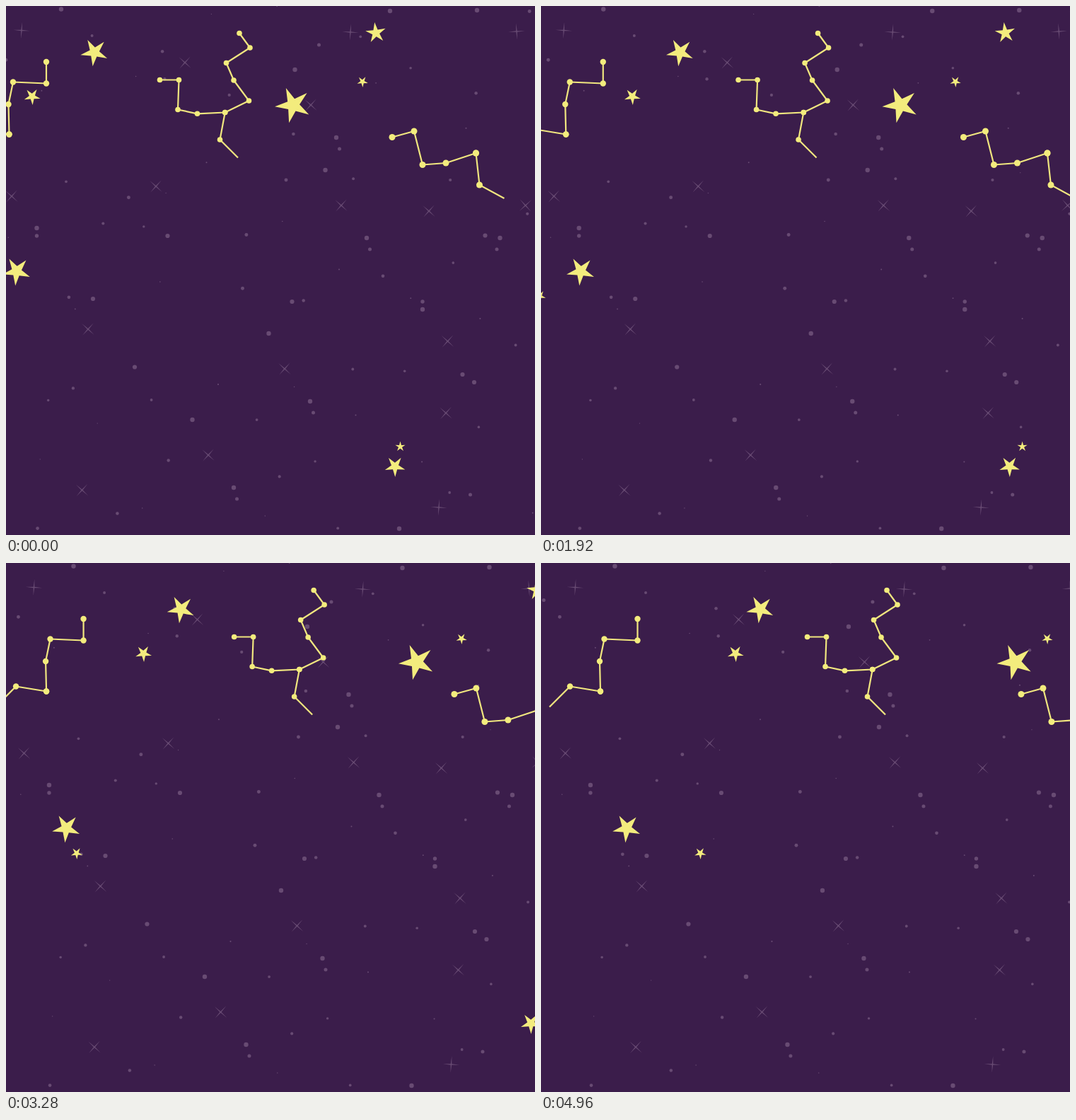
These frames come from a looping animation (748 by 748 pixels, 5 s). An HTML page:

```html
<!DOCTYPE html>
<html lang="en">
<head>
<meta charset="utf-8">
<title>Night sky</title>
<style>
html, body { margin: 0; width: 100%; height: 100%; overflow: hidden; background: #3b1d4b; }
svg { display: block; width: 100vw; height: 100vh; }
</style>
</head>
<body>
<svg id="sky" viewBox="0 0 748 748"></svg>
<script>
const LOOP = 5000, STEP = 40, SIZE = 748;
const YELLOW = '#f3ec7d', LINE = '#f0e67f', DUST = '#684b73';
const sky = document.getElementById('sky');
const layers = [];

function add(parent, tag, attrs) {
  const el = document.createElementNS('http://www.w3.org/2000/svg', tag);
  for (const k in attrs) el.setAttribute(k, attrs[k]);
  parent.appendChild(el);
  return el;
}

// A group that drifts right at the given speed (px per second).
function layer(speed, fill, x = 0, y = 0) {
  const el = add(sky, 'g', { fill });
  layers.push({ el, speed, x, y });
  return el;
}

const dot = (parent, cx, cy, r) => add(parent, 'circle', { cx, cy, r });

// Points of a star with the given number of tips; turn is in degrees.
function starPoints(tips, outer, inner, turn) {
  return Array.from({ length: tips * 2 }, (_, i) => {
    const r = i % 2 ? inner : outer;
    const a = turn * Math.PI / 180 + i * Math.PI / tips;
    return `${(r * Math.cos(a)).toFixed(2)},${(r * Math.sin(a)).toFixed(2)}`;
  }).join(' ');
}

function sparkle(parent, x, y, turn) {
  add(parent, 'polygon', { points: starPoints(4, 11.8, 1.1, turn), transform: `translate(${x} ${y})` });
}

function random(seed) {
  return () => (seed = seed * 16807 % 2147483647) / 2147483647;
}

// Dust motifs, repeated over the sky with mirroring.
const motifs = {
  plus(g) {
    sparkle(g, 0, 0, 4);
    dot(g, 56, -30, 3.2);
    dot(g, -44.5, 18, 2.5);
  },
  clump(g) {
    dot(g, 0, 0, 3.2);
    dot(g, 4.5, 16, 2.5);
    dot(g, -58.5, -96, 3.2);
    sparkle(g, -36, -46, 42);
  },
  pair(g) {
    dot(g, 0, 0, 3.2);
    dot(g, 0, 11, 2.7);
    sparkle(g, -35.5, -45, 42);
  },
  cross(g) { sparkle(g, 0, 0, 42); },
  speck(g) { dot(g, 0, 0, 3.1); }
};

const dust = layer(5.33, DUST);

function place(name, spots) {
  for (const [x, y, sx = 1, sy = 1] of spots)
    motifs[name](add(dust, 'g', { transform: `translate(${x} ${y}) scale(${sx} ${sy})` }));
}

place('plus', [[22, 34.5], [487, 37], [722, 36, -1], [612, 709, -1, -1]]);
place('clump', [[467, 186], [510, 328], [430, 559], [322, 681], [698.5, 328, -1]]);
place('pair', [[43.5, 314], [589, 429, -1, -1]]);
place('cross', [[253, 80], [212, 255], [598, 290], [116, 457], [622, 575.5], [107.5, 684.5]]);
place('speck', [[123, 414], [182, 510.5], [228.5, 325], [404.5, 418], [645.5, 521], [662, 532], [677.5, 324.5]]);

// Finer dust: one speck per jittered grid cell.
const rnd = random(29), CELLS = 8, cell = SIZE / CELLS;
for (let i = 0; i < CELLS * CELLS; i++) {
  const x = (i % CELLS + rnd()) * cell;
  const y = (Math.floor(i / CELLS) + rnd()) * cell;
  dot(dust, x.toFixed(1), y.toFixed(1), i % 5 < 3 ? 1.7 + 0.8 * rnd() : 0.6 + 0.5 * rnd());
}

function constellation(speed, points, tail, r, width) {
  const g = layer(speed, YELLOW);
  const stroke = pts => add(g, 'polyline', {
    points: pts, fill: 'none', stroke: LINE, 'stroke-width': width, 'stroke-linejoin': 'round'
  });
  stroke(points);
  stroke(tail);
  // The tail's last point stays open, without a dot.
  const ends = tail.split(' ').slice(0, -1).join(' ');
  for (const p of `${points} ${ends}`.split(' ')) dot(g, ...p.split(','), r);
}

constellation(16.03, '57,79 57,109.5 10,107.5 3.5,139 4.5,181.5', '4.5,181.5 -38.5,174.5 -67.5,203.5', 4.2, 2.2);
constellation(32.06,
  '217.5,104.5 244.5,104.5 243,146.5 270.5,152.3 309.7,150.5 343.5,134 322,105 311.5,80.5 345,59 330,38.5',
  '309.7,150.5 302.5,189 328,214.5', 3.8, 2.2);
constellation(26.8, '546,185.5 577,177 589,224.5 622,222 664.5,208', '664.5,208 669.5,253 704.5,272', 4.5, 2.2);

// x, y, radius, turn, speed
const stars = [
  [125, 65.5, 20, 25, 37.3],
  [37, 128, 12, 15, 48],
  [406, 140, 26, 31, 53.3],
  [523, 38, 15, 47, 69.5],
  [504, 107, 8, 15, 42.7],
  [15, 375, 20.5, 23, 21.4],
  [550, 651, 15, 17, 58.6],
  [557.5, 623, 7.5, 54, 64.1],
  [-144.8, 410.5, 8.6, 15, 74.6]
];
for (const [x, y, r, turn, speed] of stars)
  add(layer(speed, YELLOW, x, y), 'polygon', { points: starPoints(5, r, r * 0.35, turn) });

function render(ms) {
  const t = Math.floor((ms % LOOP) / STEP) * STEP / 1000;
  for (const { el, speed, x, y } of layers)
    el.setAttribute('transform', `translate(${(x + speed * t).toFixed(3)} ${y})`);
}

const start = performance.now();
function tick() {
  render(performance.now() - start);
  requestAnimationFrame(tick);
}
tick();
</script>
</body>
</html>
```
